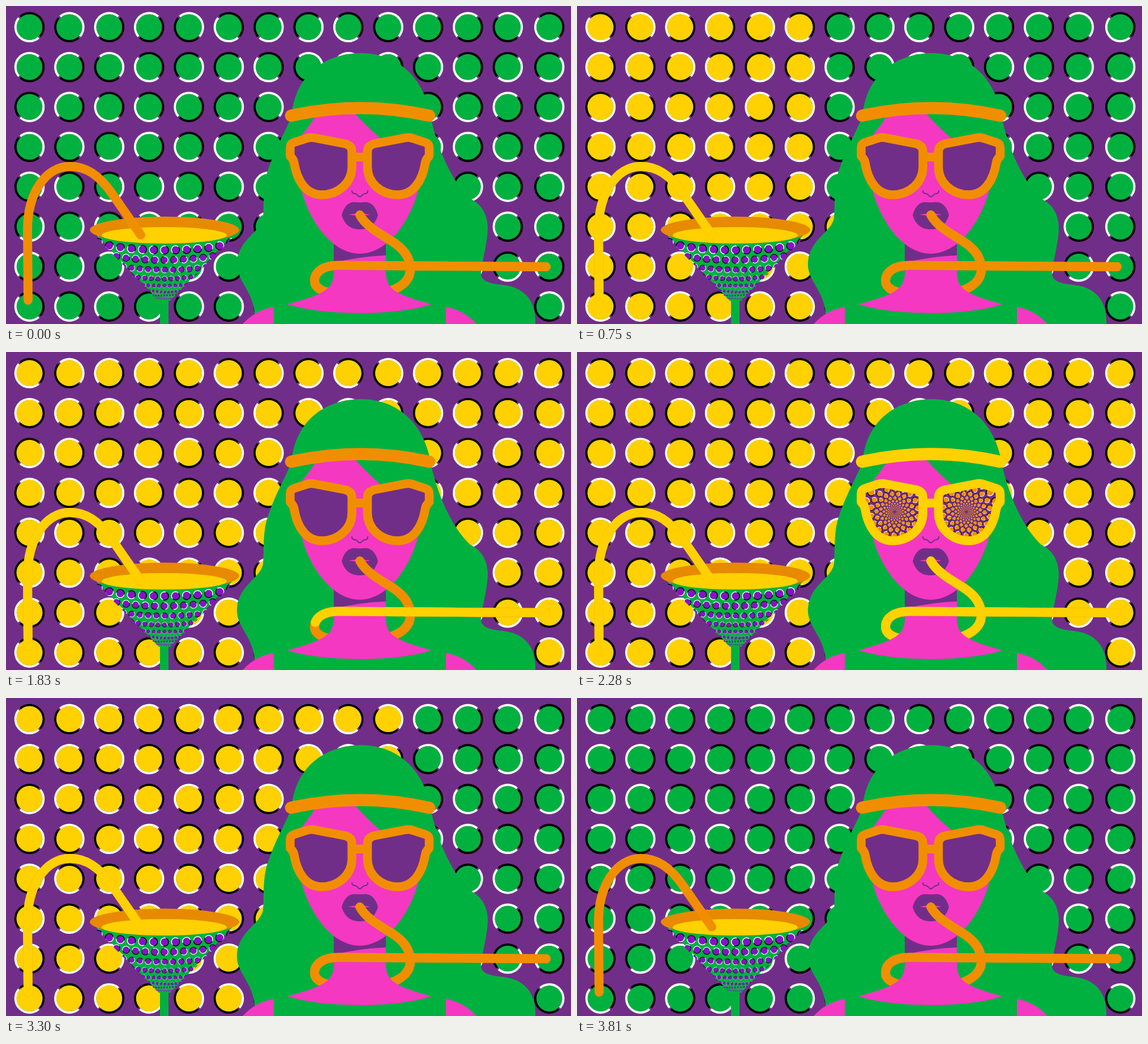
An HTML page that plays this animation: 998 by 561 pixels, repeating every 3990 ms.

```html
<!DOCTYPE html>
<html lang="en">
<head>
<meta charset="utf-8">
<title>Neon sip</title>
<style>
html, body { margin: 0; width: 100%; height: 100%; overflow: hidden; background: #712e89; }
svg { display: block; width: 100vw; height: 100vh; }
.line { fill: none; stroke-linecap: round; stroke-linejoin: round; }
.juice { stroke: #ffd100; }
.peel { stroke: #f18e00; }
</style>
</head>
<body>
<svg viewBox="0 0 998 561">
  <defs>
    <clipPath id="dotClip"></clipPath>
    <clipPath id="coneClip"><path d="M155 404L270 521H290L405 404Z"/></clipPath>
    <clipPath id="frontClip"><rect width="998" height="482"/></clipPath>
    <clipPath id="frameClip"><rect id="frameWipe" y="200" width="400" height="160"/></clipPath>
    <clipPath id="lensWipeClip"><rect id="lensWipe" y="200" width="400" height="160"/></clipPath>
    <path id="lens" d="M502 250Q502 243 508 241L531 233.500Q537 231 544 232.500L599 243Q611 246 611 257V284C611 311 588 333 557 333C530 333 514 308 509 277Q508 270 502 265Z"/>
    <clipPath id="lensClip"><use href="#lens"/><use href="#lens" transform="matrix(-1 0 0 1 1249.500 0)"/></clipPath>
    <g id="frames">
      <use href="#lens"/>
      <use href="#lens" transform="matrix(-1 0 0 1 1249.500 0)"/>
      <path d="M617 266.500H633"/>
    </g>
    <path id="band" d="M503.500 193.500Q625.500 166.500 747.500 193.500"/>
    <path id="pipe" d="M238 404L188 332C164 297 140 283 113 283C70 283 38 330 38 395L39 519"/>
    <path id="loop" d="M954 460L590 457.500C560 457 545 469 545 485C545 502 570 510 625 510C685 510 714 490 714 465C714 444 704 429 680 414C655 399 634 386 625 368.500"/>
  </defs>

  <rect width="998" height="561" fill="#712e89"/>
  <g id="grid"></g>
  <g clip-path="url(#dotClip)"><path id="snake" class="line juice" stroke-width="48"/></g>

  <rect x="272" y="514" width="15" height="47" fill="#00b140"/>
  <path d="M160 404L270 520H290L400 404Z" fill="#00b140"/>
  <g id="cone" clip-path="url(#coneClip)"></g>
  <ellipse cx="280" cy="395" rx="132" ry="23.500" fill="#e78a00"/>
  <ellipse cx="279.500" cy="404.500" rx="110.500" ry="14.500" fill="#ffd100"/>
  <g class="line" stroke-width="16">
    <use href="#pipe" class="peel"/>
    <use href="#pipe" class="juice" id="pipeFill"/>
  </g>

  <path fill="#00b140" d="M625 83C565 84 511 120 504 194C498 214 474 252 461 295C453 322 456 352 454 374C449 400 412 410 408 451C405 488 442 500 440 561H935C937 520 915 496 878 492C852 490 838 484 839 471C841 447 851 419 851 390C850 364 837 348 820 340C790 312 764 258 751 200C740 124 690 83 625 83Z"/>
  <g class="line" stroke-width="16">
    <use href="#loop" class="peel"/>
    <use href="#loop" class="juice loopFill"/>
  </g>
  <g fill="#f538c1">
    <path d="M579 400H671V470C672 498 684 508 751 526C692 547 558 547 497 526C566 508 578 498 579 470Z"/>
    <path d="M418 561Q441 536 473 531V561ZM831 561Q808 536 777 531V561Z"/>
  </g>
  <path d="M579 400H671V440Q622 442 579 453Z" fill="#712e89"/>
  <path fill="#f538c1" d="M547 194Q532 218 510 242L522 325C535 377 575 437 625 437C675 437 715 377 728 325L739 260L690 252L662 234Q637 213 616 189Z"/>
  <path class="line" stroke="#712e89" stroke-width="2" d="M611 326Q611 331 617 331Q620 332 622 335Q625 338 628 335Q630 332 634 331Q639 331 639 326"/>
  <path fill="#712e89" d="M593 369C597 352 607 345 617 346Q625 347 633 346C643 345 653 352 657 369C652 386 641 394 625 394C609 394 598 386 593 369Z"/>
  <path fill="#f538c1" d="M605 368Q616 366.500 625 365Q634 366.500 644 368Q634 369.500 625 371Q616 369.500 605 368Z"/>
  <g class="line" stroke-width="16" clip-path="url(#frontClip)">
    <use href="#loop" class="peel"/>
    <use href="#loop" class="juice loopFill"/>
  </g>

  <g class="line" stroke-width="21.500">
    <use href="#band" class="peel"/>
    <use href="#band" class="juice" id="bandFill"/>
  </g>
  <g fill="#712e89"><use href="#lens"/><use href="#lens" transform="matrix(-1 0 0 1 1249.500 0)"/></g>
  <g clip-path="url(#lensWipeClip)"><g id="swirl" clip-path="url(#lensClip)"></g></g>
  <g class="line" stroke-width="15.500">
    <use href="#frames" class="peel"/>
    <g clip-path="url(#frameClip)"><use href="#frames" class="juice"/></g>
  </g>
</svg>
<script>
const $ = id => document.getElementById(id);
const LOOP = 3990, STEP = 30, PITCH = 70.4, COLS = 14, ROWS = 8;
const colX = c => 41.5 + c * PITCH + (c === COLS - 1 ? 3 : 0);
const rowY = r => 37.3 + r * PITCH;
const disc = (x, y, r, fill) => `<circle cx="${x.toFixed(2)}" cy="${y.toFixed(2)}" r="${r.toFixed(2)}" fill="${fill}"/>`;

// A disc inside a ring that is half white, half black; "turn" points to the white half.
function ringed(x, y, r, w, turn, fill, gap) {
  const R = r + w / 2 - 0.2, h = (90 - gap) * Math.PI / 180;
  const at = a => `${(R * Math.cos(a)).toFixed(2)} ${(R * Math.sin(a)).toFixed(2)}`;
  const arc = (mid, color) =>
    `<path d="M${at(mid - h)}A${R} ${R} 0 0 1 ${at(mid + h)}" fill="none" stroke="${color}" stroke-width="${w}"/>`;
  return `<g transform="translate(${x.toFixed(2)} ${y.toFixed(2)}) rotate(${turn.toFixed(1)})">` +
    arc(0, '#fff') + arc(Math.PI, '#000') + disc(0, 0, r, fill) + '</g>';
}

// Quarter turns whose step grows by one from cell to cell, flipped on a checkerboard.
const quarter = (c, r) => 1 + c * (5 - c) / 2 - r * (r + 1) / 2 + 2 * c * r;

function buildGrid() {
  let dots = '', clip = '', way = '';
  for (let c = 0; c < COLS; c++) {
    for (let r = 0; r < ROWS; r++) {
      dots += ringed(colX(c), rowY(r), 22.8, 4.2, 225 - 90 * quarter(c, r), '#00b140', 4);
      clip += disc(colX(c), rowY(r), 23, '#000');
    }
    const up = c % 2 === 0;
    const from = up ? (c ? ROWS - 1 : ROWS) : 0;
    const to = up ? 0 : (c === COLS - 1 ? ROWS : ROWS - 1);
    way += `${c ? 'L' : 'M'}${colX(c)} ${rowY(from)}L${colX(c)} ${rowY(to)}`;
  }
  $('grid').innerHTML = dots;
  $('dotClip').innerHTML = clip;
  $('snake').setAttribute('d', way);
}

function buildCone() {
  const gaps = [19.5, 17, 14.5, 11.8, 9.2, 6.9, 4.9, 3.3];
  const tops = [430.5, 448, 465.5, 481, 494, 504, 511, 516.5];
  let out = '';
  gaps.forEach((s, i) => {
    for (let k = -6; k <= 6; k++) {
      const y = tops[i] - s * (1 - Math.sqrt(1 - k * k / 40));
      out += ringed(280 + k * s, y, s * 0.33, s * 0.085, 200 + 150 * i + k * 24, '#8a10c8', 6);
    }
  });
  $('cone').innerHTML = out;
}

function buildSwirl() {
  const n = 18;
  let out = '';
  for (const cx of [561, 688]) {
    for (let i = 0; i < 12; i++) {
      const R = 54 * Math.pow(0.77, i);
      for (let k = 0; k < n; k++) {
        const a = (k + i / 2) * 2 * Math.PI / n;
        out += ringed(cx + R * Math.cos(a), 282 + R * Math.sin(a), R * 0.105, R * 0.03,
          a * 180 / Math.PI + 90, '#f18e00', 5);
      }
    }
  }
  $('swirl').innerHTML = out;
}

// Linear interpolation through [time, value] pairs.
function track(t, keys) {
  if (t <= keys[0][0]) return keys[0][1];
  for (let i = 1; i < keys.length; i++) {
    const [t0, v0] = keys[i - 1], [t1, v1] = keys[i];
    if (t <= t1) return v0 + (v1 - v0) * (t - t0) / (t1 - t0);
  }
  return keys[keys.length - 1][1];
}

const PIPE = [[0, 0], [210, 1], [3645, 1], [3810, 0]];
const SNAKE = [[200, -1], [750, 50], [1380, 108.8], [1440, 110.6], [1590, 112], [3171, 112], [3656, -1]];
const LOOPS = [[1650, 0], [1980, 1], [2735, 1], [2950, 0]];
const BAND = [[2010, 0], [2190, 1], [2990, 1], [3170, 0]];
const FRAME = [[1980, 765], [2160, 510], [2220, 485], [2935, 485], [2970, 500], [3170, 765]];
const LENS = [[1990, 765], [2190, 530], [2280, 485], [2935, 485], [2970, 518], [3165, 765]];

function trim(el, length) {
  el.style.visibility = length > 0 ? 'visible' : 'hidden';
  el.style.strokeDasharray = `${Math.max(length, 0.01)} 20000`;
}

buildGrid();
buildCone();
buildSwirl();
const size = { pipe: $('pipe').getTotalLength(), loop: $('loop').getTotalLength(), band: $('band').getTotalLength() };
const loopFills = document.querySelectorAll('.loopFill');

function draw(ms) {
  const t = Math.floor(ms % LOOP / STEP) * STEP;
  trim($('pipeFill'), track(t, PIPE) * (size.pipe + 1));
  trim($('snake'), (track(t, SNAKE) + 1) * PITCH);
  loopFills.forEach(el => trim(el, track(t, LOOPS) * (size.loop + 1)));
  trim($('bandFill'), track(t, BAND) * (size.band + 1));
  $('frameWipe').setAttribute('x', track(t, FRAME));
  $('lensWipe').setAttribute('x', track(t, LENS));
}

const start = performance.now();
function tick() {
  draw(performance.now() - start);
  requestAnimationFrame(tick);
}
tick();
</script>
</body>
</html>
```
